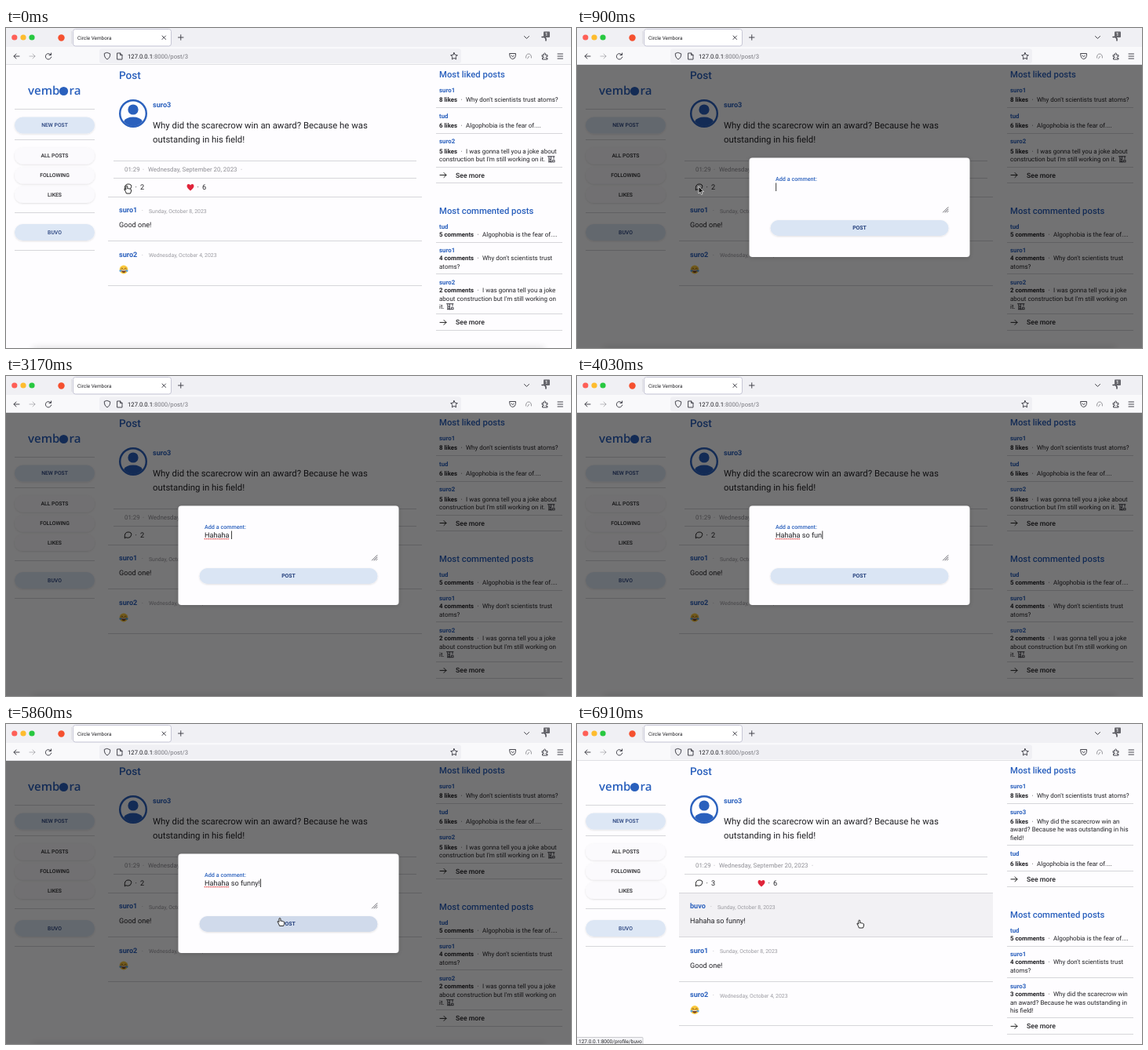
These frames come from a looping animation (720 px wide and 408 px high, 6940 ms). An HTML page:

```html
<!DOCTYPE html>
<html lang="en">
<head>
<meta charset="utf-8">
<title>Circle Vembora</title>
<style>
html, body { margin: 0; width: 100%; height: 100%; overflow: hidden; background: #fefdff; }
svg { display: block; }
text { font-family: Roboto, sans-serif; white-space: pre; text-rendering: geometricPrecision; }
.line { fill: none; stroke: #45454d; stroke-width: 1; stroke-linecap: round; stroke-linejoin: round; }
</style>
</head>
<body>
<svg id="stage" width="720" height="408" viewBox="0 0 720 408"></svg>
<script>
const LOOP = 6940, BLINK = 567;
const BLUE = '#2a60bd', INK = '#222226', NAVY = '#243f7c', GREY = '#8e8e94', RULE = '#d6d6da';
const ANN = 'suro1', BEA = 'suro2', CAL = 'suro3', DOT = 'tud', ME = 'buvo';

// y is the middle of the capitals
const text = (x, y, size, str, fill = INK, weight = 400, extra = '') =>
  `<text x="${x}" y="${y + size * .355}" font-size="${size}" fill="${fill}" font-weight="${weight}" ${extra}>${str}</text>`;
const rect = (x, y, w, h, fill, r = 0, extra = '') =>
  `<rect x="${x}" y="${y}" width="${w}" height="${h}" rx="${r}" fill="${fill}" ${extra}/>`;
const circle = (x, y, r, fill, extra = '') => `<circle cx="${x}" cy="${y}" r="${r}" fill="${fill}" ${extra}/>`;
const line = (d, extra = '') => `<path class="line" d="${d}" ${extra}/>`;
const rule = (x1, x2, y) => rect(x1, Math.floor(y - .5), x2 - x1, 1, RULE);
const at = (x, y, body) => `<g transform="translate(${x} ${y})">${body}</g>`;
const group = (id, body) => `<g id="${id}">${body}</g>`;

const pill = (y, label, tinted) =>
  rect(11, y - 10.5, 102, 21, tinted ? '#dde7f5' : '#fbfafd', 10.5, 'filter="url(#soft)"') +
  text(62, y, 6.8, label, tinted ? NAVY : INK, 500, 'text-anchor="middle"');

const crane = (x, y) => at(x, y,
  line('M0-3.5H8.5M1.5-3.5V3.5M4-3.5V3.5M1.5-1L4 1M1.5 1.5L4 3.5M7.5-3.5V-1M1 3.5H8.5M6 3V1H8.5V3'));

const laugh = y => at(150, y,
  circle(0, 0, 5.4, '#fbc93d') +
  '<path d="M-3.4 .3H3.4Q2.8 4 0 4T-3.4 .3Z" fill="#6b3a1c"/><path d="M-2.8 .6H2.8V1.6H-2.8Z" fill="#fff"/>' +
  line('M-3.4-1.3Q-2.2-2.8-1-1.3M1-1.3Q2.2-2.8 3.4-1.3', 'style="stroke:#6b3a1c;stroke-width:.8"') +
  circle(-4.2, 1.6, 1.3, '#4fa8ea') + circle(4.2, 1.6, 1.3, '#4fa8ea'));

const wordmark = 'style="font-family:\'Open Sans\',sans-serif"';
const sidebar =
  text(28, 80, 15, 'vemb', BLUE, 600, wordmark) + circle(73.5, 80.5, 5.6, BLUE) + text(80.5, 80, 15, 'ra', BLUE, 600, wordmark) +
  [104, 143, 236, 284].map(y => rule(11, 113, y)).join('') +
  pill(124, 'NEW POST', true) + pill(163, 'ALL POSTS') + pill(188, 'FOLLOWING') +
  pill(212.5, 'LIKES') + pill(260.5, ME.toUpperCase(), true);

const post = count =>
  text(144, 60.4, 13.6, 'Post', BLUE, 500) +
  circle(162, 109, 18, BLUE) + circle(162, 109, 15.6, '#fefdff') + circle(162, 104, 6.6, BLUE) +
  `<path d="M150 119Q153 113.5 162 113.5T174 119Q169 125 162 125T150 119Z" fill="${BLUE}"/>` +
  text(187, 98, 9.1, CAL, BLUE, 700) +
  text(187, 124, 11.36, 'Why did the scarecrow win an award? Because he was') +
  text(187, 142, 11.36, 'outstanding in his field!') +
  rule(137, 523, 169.5) + rule(137, 523, 191.5) +
  text(151, 180, 7.87, '01:29', GREY) + text(174, 180, 7.87, '·', GREY) +
  text(181, 180, 7.87, 'Wednesday, September 20, 2023', GREY) + text(299, 180, 7.87, '·', GREY) +
  line('M151.3 206.5Q150.6 199 155.5 199T159.7 202.7T155.5 206.3Q154 206.3 153.3 205.9Z', 'style="stroke:#222"') +
  text(164.5, 203, 9.2, '·') + text(171, 203, 9.2, count) +
  '<path d="M235 207.5Q230.5 204 230.5 201.3Q230.6 199 232.8 199Q234.4 199 235 200.5Q235.6 199 237.2 199Q239.4 199 239.5 201.3Q239.5 204 235 207.5Z" fill="#e0243a"/>' +
  text(243.5, 203, 9.2, '·') + text(250, 203, 9.2, '6');

const comment = (y, name, date, body, nameWidth = 23) =>
  text(144, y + 16.5, 9.1, name, BLUE, 700) + text(144 + nameWidth + 6, y + 17.5, 6.9, '·', GREY) +
  text(144 + nameWidth + 15, y + 17.8, 6.9, date, '#9a9aa0') +
  (body ? text(144, y + 35.5, 9.1, body) : laugh(y + 36)) + rule(130, 530, y + 56.5);

// One sidebar list; every entry is [name, label, label width, first line, ...more lines]
function ranking(y, title, gap, entries) {
  let out = text(552, y + .6, 11.3, title, BLUE, 500);
  y += 21;
  for (const [name, label, width, first, ...more] of entries) {
    out += text(552, y, 7.9, name, BLUE, 700);
    y += gap;
    out += text(552, y, 7.9, label, INK, 700) + text(552 + width + 4.5, y, 8, '·') + text(552 + width + 11, y, 8, first);
    for (const row of more) {
      y += 10.4;
      out += text(552, y, 8, row);
      if (row.endsWith('it.')) out += crane(row.length > 5 ? 690.5 : 561.5, y);
    }
    out += rule(548, 709, y += 10.3);
    y += 9.9;
  }
  return out + line(`M553 ${y}h8m-3-3l3 3l-3 3`, 'style="stroke:#222"') +
    text(573, y, 8.7, 'See more', INK, 500) + rule(548, 709, y + 10.4);
}

const atoms = [ANN, '8 likes', 23, "Why don't scientists trust atoms?"];
const fear = [DOT, '6 likes', 23, 'Algophobia is the fear of....'];
const talked = [
  [DOT, '5 comments', 44, 'Algophobia is the fear of....'],
  [ANN, '4 comments', 44, "Why don't scientists trust", 'atoms?']
];

const oldPage = sidebar + post(2) + rule(130, 530, 215.5) +
  comment(215.5, ANN, 'Sunday, October 8, 2023', 'Good one!') +
  comment(272, BEA, 'Wednesday, October 4, 2023') +
  ranking(58, 'Most liked posts', 12.5, [atoms, fear,
    [BEA, '5 likes', 23, 'I was gonna tell you a joke about', "construction but I'm still working on it."]]) +
  ranking(232, 'Most commented posts', 10.2, [...talked,
    [BEA, '2 comments', 44, 'I was gonna tell you a joke', "about construction but I'm still working on", 'it.']]) +
  rect(34, 407, 652, 8, '#000', 0, 'opacity=".12" filter="url(#blur)"');

const newPage = rect(130, 215, 400, 57, '#f2f1f4', 0, 'id="hover"') + sidebar + post(3) + rule(130, 530, 215.5) +
  comment(215.5, ME, 'Sunday, October 8, 2023', 'Hahaha so funny!', 20) +
  comment(272, ANN, 'Sunday, October 8, 2023', 'Good one!') +
  comment(328.5, BEA, 'Wednesday, October 4, 2023') +
  ranking(58, 'Most liked posts', 12.5, [atoms,
    [CAL, '6 likes', 23, 'Why did the scarecrow win an', 'award? Because he was outstanding in his', 'field!'], fear]) +
  ranking(242, 'Most commented posts', 10.2, [...talked,
    [CAL, '3 comments', 44, 'Why did the scarecrow win', 'an award? Because he was outstanding in', 'his field!']]);

const chrome =
  rect(0, 0, 720, 24, '#f0f0f4') + rect(0, 24, 720, 23, '#f9f9fb') + rect(0, 46, 720, 1, '#e0e0e4') +
  circle(10.8, 12, 3.6, '#fe5f57') + circle(22, 12, 3.6, '#febc2e') + circle(33, 12, 3.6, '#28c840') +
  circle(70.5, 12.5, 4.2, '#f5502f') + rect(83, 4, .7, 16, '#d5d5da') +
  rect(85.5, 1.5, 125, 21.5, '#fff', 3, 'stroke="#b9b9cc" stroke-width=".8"') +
  line('M199 10l4.5 4.5m0-4.500l-4.5 4.5M219.5 12h6.5m-3.25-3.250v6.5M660.5 10.5l3 3l3-3') +
  line('M683 11.5h3l2 2v2.5', 'style="stroke-width:1.5"') +
  rect(119, 26.5, 461, 18.5, '#f0f0f4', 3) +
  line('M17 36h-7m3-3l-3 3l3 3') + line('M30 36h7m-3-3l3 3l-3 3', 'opacity=".35"') +
  line('M129 31.5l3.7 1.3q.3 5-3.7 7.2q-4-2.2-3.7-7.2zM142 32h3.5l2.5 2.5v5.5h-6zM145.5 32v2.5h2.5') +
  line('M571 31.5l1.3 2.8l3 .4l-2.2 2.1l.5 3.1l-2.6-1.5l-2.6 1.5l.5-3.1l-2.2-2.1l3-.4z') +
  line('M642 32.5h7.5v3q-.8 4-3.75 4t-3.75-4zM644 35l1.75 1.7l1.75-1.7') +
  line('M662.5 38q0-5 3.5-5t3.5 5M664.5 39l2-3', 'opacity=".55"') +
  line('M683.5 34.5h2q-.5-2.5 1-2.5t1 2.5h2.5v2q-2-.5-2 1t2 1v1.5h-6.5v-2q2 .3 2-.8t-2-.8z') +
  line('M703 33h6.5m-6.5 3h6.5m-6.5 3h6.5') +
  text(155, 36, 7.7, '127.0.0.1<tspan fill="#77777e">:8000/post/3</tspan>', '#1c1c22') +
  group('idle', text(91, 12.5, 6.4, 'Circle Vembora') + line('M57 34a3.7 3.7 0 1 0 .7 3M57.5 32v2.5h-2.5') +
    rect(685, 4.5, 8, 7.5, '#66666c', 1) + text(687, 8.3, 6, '1', '#fff', 500)) +
  group('busy', text(103, 12.5, 6.4, 'Circle Vembora') +
    line('M92.5 9h5m-5 7h5M93 9q0 2 2 3.5q-2 1.5-2 3.5M97 9q0 2-2 3.5q2 1.5 2 3.5', 'style="stroke-width:.8"') +
    line('M51.5 33.5l5 5m0-5l-5 5') + rect(682, 5, 11, 7, '#55555c', 1));

const modal =
  rect(219.5, 165.5, 281, 126.5, '#fefdff', 4, 'filter="url(#deep)"') +
  rect(246, 196, 228, 40, '#fefdff', 2, 'id="field" filter="url(#soft)"') +
  text(253, 192.5, 7.2, 'Add a comment:', BLUE, 500, 'id="label"') +
  text(253, 202.7, 9.15, '', INK, 400, 'id="typed"') +
  line('M253 207.7h31.5', 'id="wavy" style="stroke:#e02b2b;stroke-width:1.1;stroke-dasharray:.8 1.5"') +
  rect(0, 197.5, .8, 10.5, '#111', 0, 'id="caret"') +
  line('M466.5 235l6.5-6.5m-4 6.5l4-4m-1.5 4l1.5-1.5', 'style="stroke:#66666c"') +
  rect(246.5, 245, 227, 20, '#dae5f4', 10, 'id="button" filter="url(#soft)"') +
  text(360, 255, 6.9, 'POST', NAVY, 700, 'id="post" text-anchor="middle"');

const status = (id, width, str) => group(id,
  rect(-1, 399.5, width, 9, '#f4f4f7', 1, 'stroke="#b8b8be" stroke-width=".7"') + text(2, 404.5, 6.5, str));

const cursors = group('cursor',
  '<path id="arrow" d="M0-4V5L2.1 3.2L3.5 6.3L5 5.6L3.6 2.7H6.5Z" fill="#111" stroke="#fff" stroke-width=".7"/>' +
  '<path id="hand" d="M-2.2-3.8Q-2.2-4.9-1.2-4.9T-.2-3.8V-1.2Q1-2 1.8-.9Q2.8-1.5 3.5-.4Q4.6-.6 4.6 .8Q4.6 3 3.4 5H-1.6Q-2.2 3-4-.1Q-4.3-1.2-3.3-1L-2.2 .2Z" fill="#fff" stroke="#111" stroke-width=".9"/>');

const shadow = (id, dy, blur, alpha) =>
  `<filter id="${id}" x="-20%" y="-50%" width="140%" height="220%"><feDropShadow dx="0" dy="${dy}" stdDeviation="${blur}" flood-opacity="${alpha}"/></filter>`;

const stage = document.getElementById('stage');
stage.innerHTML =
  `<defs>${shadow('soft', .8, 1, .13)}${shadow('deep', 1, 3, .15)}
  <filter id="blur" x="-5%" y="-200%" width="110%" height="500%"><feGaussianBlur stdDeviation="4"/></filter></defs>` +
  rect(0, 0, 720, 408, '#fefdff') + group('before', oldPage) + group('after', newPage) +
  rect(0, 47, 720, 361, '#000', 0, 'id="shade"') + group('modal', modal) + chrome +
  status('transfer', 137, 'Transferring data from 127.0.0.1...') +
  status('link', 85, `127.0.0.1:8000/profile/${ME}`) + cursors;

const ui = {};
for (const el of stage.querySelectorAll('[id]')) ui[el.id] = el;
const show = (el, on) => el.style.display = on ? '' : 'none';
const set = (el, attrs) => { for (const k in attrs) el.setAttribute(k, attrs[k]); };
const ramp = (t, from, to) => {
  const p = Math.min(1, Math.max(0, (t - from) / (to - from)));
  return p * p * (3 - 2 * p);
};

const message = 'Hahaha so funny!';
const keys = [1050, 1180, 1310, 1440, 2300, 2440, 2660, 3240, 3350, 3470, 3580, 3700, 3880, 4060, 4390, 4600];
const CLICK = 6080, LOADED = 6700, HOVER = 6750;

function render(t) {
  const loaded = t >= LOADED, sent = t >= CLICK, loading = sent && !loaded;
  show(ui.before, !loaded);
  show(ui.after, loaded);
  show(ui.hover, t >= HOVER);
  show(ui.link, t >= HOVER);
  show(ui.transfer, loading && t > CLICK + 80);
  show(ui.busy, loading);
  show(ui.idle, !loading);
  ui.shade.style.opacity = loaded ? 0 : .55 * ramp(t, 20, 300);
  ui.modal.style.opacity = loaded ? 0 : ramp(t, 330, 600);

  const count = keys.filter(k => k <= t).length;
  ui.typed.textContent = message.slice(0, count);
  const since = t - (count ? keys[count - 1] : 600);
  set(ui.caret, { x: 253.3 + (count ? ui.typed.getComputedTextLength() : 0) });
  show(ui.caret, !sent && since >= 0 && since % (2 * BLINK) < BLINK);
  show(ui.wavy, count > 6);

  const move = ramp(t, 5310, 5950), x = 155 + 206 * move, y = 206 + 49 * move;
  const pointing = t < 30 || y > 246;
  set(ui.cursor, { transform: `translate(${x} ${y})` });
  show(ui.cursor, t < keys[0] || t >= 5310);
  show(ui.hand, pointing);
  show(ui.arrow, !pointing);

  show(ui.field, sent);
  set(ui.label, { fill: sent ? NAVY : BLUE, 'font-weight': sent ? 400 : 500 });
  set(ui.button, { width: sent ? 43.5 : 227, fill: y > 246 ? '#d0daeb' : '#dae5f4' });
  set(ui.post, { x: sent ? 268.2 : 360 });
}

function tick() {
  render(performance.now() % LOOP);
  requestAnimationFrame(tick);
}
tick();
</script>
</body>
</html>
```
